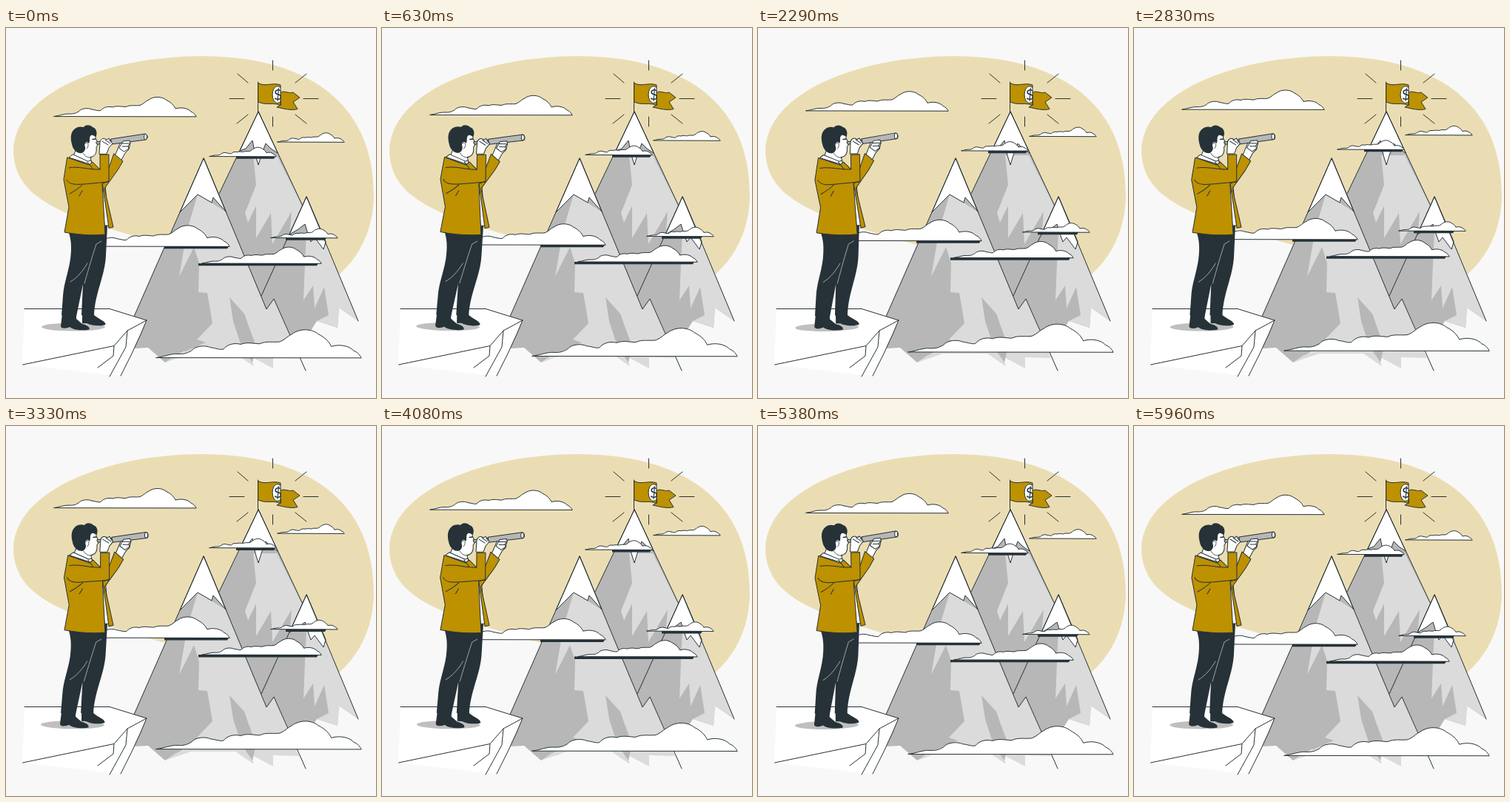
Write an HTML page that moves like this. It is 500x500 px and loops after 6000 ms.

```html
<!DOCTYPE html>
<html lang="en">
<head>
<meta charset="utf-8">
<title>Looking at the summit</title>
<style>
html, body { margin: 0; width: 100%; height: 100%; overflow: hidden; background: #f8f8f8 }
svg { display: block; width: 100%; height: 100%; stroke-linejoin: round; stroke-linecap: round }
.line { fill: none; stroke: #263238 }
.ink { stroke: #263238 }
.white { fill: #fff }
.gold { fill: #bd9100 }
.dark { fill: #263238 }
.shade { fill: #b7b7b7 }
.light { fill: #dbdbdb }
.seam { fill: none; stroke: #bdc1c3; stroke-width: .8 }
</style>
</head>
<body>
<svg viewBox="0 0 500 500">
  <defs>
    <path id="puff" vector-effect="non-scaling-stroke" class="white ink" d="M0 0C8-1 14-4 20-3.500C27-3 30-5 33-6.500C36-11 46-12 51-9.500C56-9 60-7 63-8C67-13 74-14 79-12.500C85-15 92-13 97-13C103-16 110-14 116-15C121-17 124-21 127-22C135-28 146-27 152-22C158-19 162-15 164-10.500C172-13 181-11 185-6.500C189-5 191-2 192 0Z"/>
    <path id="cloth" d="M341 74.500C350 80 361 73 371 77V104.500C361 100 351 105 341 100Z"/>
    <clipPath id="onCloth"><use href="#cloth"/></clipPath>
  </defs>

  <path fill="#ebddb3" d="M10 166C12 85 140 38 265 38C405 38 497 100 497 225C497 275 475 312 449 334L350 380L215 293C78 255 11 232 10 166Z"/>

  <!-- flag and rays -->
  <path class="line" d="M360.500 44V57M360.500 120V133M313 62L327 74M406 62L391 74M302 95.500H322M402 95.500H422M327 117L312 129M391 117L406 129"/>
  <path class="gold ink" d="M371 87C376 84 382 89 388 87L397 94L388 100L394 109.500C385 112 376 109 366 107L371 104Z"/>
  <use href="#cloth" class="gold"/>
  <g clip-path="url(#onCloth)">
    <ellipse class="white ink" cx="367" cy="90" rx="7" ry="11.500"/>
    <text x="367.500" y="97" text-anchor="middle" font-family="Lato, 'Open Sans', sans-serif" font-size="20" class="dark">$</text>
  </g>
  <use href="#cloth" class="line"/>
  <path class="line" d="M340.500 73V114"/>

  <!-- back mountain -->
  <path class="shade" d="M341 113L288 224L278 240L340 375L400.500 239.500Z"/>
  <path class="light" d="M334 172H366L400 240L383 284L386 248L360 292L358 250L338 284V240L327 263L323 250L338 212Z"/>
  <path class="white ink" d="M341 113L316 166L324 163L333 152L337 172L341 185L345 172L351 156L358 163L367 169Z"/>
  <path class="line" d="M288 224L341 113L400.500 239.500"/>

  <!-- right mountain -->
  <path class="shade" d="M406 228L345 362L352 380L362 366L384 415L410 412L420 396L448 405L450 378L476 396Z"/>
  <path class="light" d="M406 275L432 290L476 396L450 378L448 405L420 396L436 388L430 350L417 379L415 348L402 368L404 318Z"/>
  <path class="white ink" d="M406 228L383 279L395 272L404 265L408 278L412 289L417 283L429 299L432 289Z"/>
  <path class="line" d="M345 362L406 228L476 396"/>

  <!-- middle mountain -->
  <path class="shade" d="M267 176L172.500 391L174 433L192 432L215 452L240 437H335L352 380Z"/>
  <path class="light" d="M259 225L245 272L234 336L254 296L261 318L260 357L272 358L279 399L258 421L270 425L228 443L215 452L250 440H310L335 457L331 444L361 460L361 445L396 446L362 366L352 380L297 248Z"/>
  <path class="shade" d="M302 364L322 386L328 403L338 430L333 452L318 430L307 396Z"/>
  <path class="white ink" d="M267 176L235 249L259 225L278 236L280 229L297 248Z"/>
  <path class="line" d="M172.500 391L267 176L352 380L362 366L405 463"/>

  <g id="clouds"></g>

  <!-- cliff -->
  <path class="white" d="M25 379.500H140L190 395L156 470L140 469L22 455Z"/>
  <path class="line" d="M25 379.500H140L190 395L164 409L146 429.500L22.500 455M146 429.500L145 443L124 459M164 409L162 431L140 471M190 395L182 414L170 440L155 470"/>

  <g id="man">
    <ellipse fill="#bfbfbf" cx="91" cy="404" rx="43" ry="5.500"/>
    <!-- shoes and trousers -->
    <path class="dark" d="M76 386L74 403C75 407 82 406 86 404C92 409 106 409 112.500 407.500C114 404 108 401 103 400L95 393V386ZM103 386V399H109C117 403 129 403 134.500 401C135 396 126 394 119 388Z"/>
    <path class="dark" d="M84 274C88 285 89 295 87 312C84 332 78 345 77 362L75 388C82 392 90 393 95 390L104 346L102 388C108 390 115 391 119 389C120 358 134 335 135 307L137 266Z"/>
    <path class="seam" d="M129 288L122 292C118 304 112 324 106 345M110 318C104 328 97 337 87 343"/>

    <!-- far arm and shirt -->
    <path class="white ink" d="M147 173L154 156C157 151 164 151 168 155L166 164L161 169L155 180Z"/>
    <path class="white ink" d="M116 184L128 209L133 267H139L134 212Z"/>
    <path class="gold ink" d="M146 170L158 180L151 192L133 217L145 269L139 270.500L130 209L138 192Z"/>

    <!-- head -->
    <path class="white ink" d="M96 160L90 176L117 188L114 174.500C120 174 123 169 122 161L125 156.500L121 149V141L101 144Z"/>
    <path class="dark" d="M89 157C87 149 87 142 92 137C96 133 101 133 105 134C108 130 114 131 117 134C122 135 124 142 121.500 147C118 145 116 143.500 114 146C112 149 114 153 112 156C109 152 105 155 107 161C108 165 104 170 100 169C95 169 90 163 89 157Z"/>
    <path class="line" stroke-width=".8" d="M107 156C111 153 113 159 109 163M104 169C107 174 111 176 116 174.500"/>
    <path class="line" stroke-width="1.500" d="M117 150.500L121 150"/>
    <path class="white ink" d="M90 171L85 175L110 183L117 187L115 179L111 180Z"/>

    <!-- coat -->
    <path class="gold ink" d="M83 175L112 185L117 181L127 191V171L139 171V207L130 210L134 279C115 281 96 279 79 276L85 242L78 205Z"/>
    <path class="line" d="M85 189C97 186 112 192 127 191M82 205C87 215 101 211 138 208M110 181L117 190M103 212C98 217 93 220 86 224M103 220L99 227"/>

    <!-- telescope and hands -->
    <path fill="#b7b7b7" class="ink" d="M122 154L143 151V156L123 157Z"/>
    <path fill="#b7b7b7" class="ink" d="M142 150L188 143C192 144 192 150 189 151L143 157Z"/>
    <ellipse class="white ink" cx="188.500" cy="147" rx="2" ry="3.800"/>
    <path class="white ink" d="M126 170L127 154C128 149 133 148 136 151L139 149L141 153L144 156L139 162L136 170Z"/>
    <path class="line" d="M130 153L138 158M134 151L141 156"/>
    <path class="white ink" d="M153 162L158 153L167 152L168 156L165 159L166 163L160 167Z"/>
    <path class="line" d="M157 156L167 156M157 160L165 160"/>
  </g>
</svg>
<script>
// left, base, width, then the underside shadow's left and right
const clouds = [
  [65, 119.5, 192],
  [367, 154, 90],
  [275, 173.5, 90, 311, 362],
  [358, 283.5, 90, 378, 431],
  [95, 295, 207, 214, 299],
  [265, 318, 161, 260, 420],
  [203, 445.5, 277]
];
const sky = document.getElementById('clouds');
const man = document.getElementById('man');

sky.innerHTML = clouds.map(([x, y, w, a, b]) =>
  (a ? `<path class="dark" d="M${a} ${y}H${b + 2}L${b} ${y + 3.3}H${a}Z"/>` : '') +
  `<use href="#puff" transform="translate(${x} ${y}) scale(${w / 192})"/>`
).join('');

// Linear swing 0, 1, 0, -1, 0 over one turn
const swing = p => 1 - Math.abs(4 * ((p + 0.25) % 1) - 2);

function draw(now) {
  const t = now % 6000;
  const rise = 10 * (1 - Math.abs(1 - t / 3000));
  sky.setAttribute('transform', `translate(0 ${-rise})`);
  man.setAttribute('transform', `rotate(${swing(t / 3000 % 1)} 119 270)`);
}

let start;
function tick(now) {
  start ??= now;
  draw(now - start);
  requestAnimationFrame(tick);
}
draw(0);
requestAnimationFrame(tick);
</script>
</body>
</html>
```
